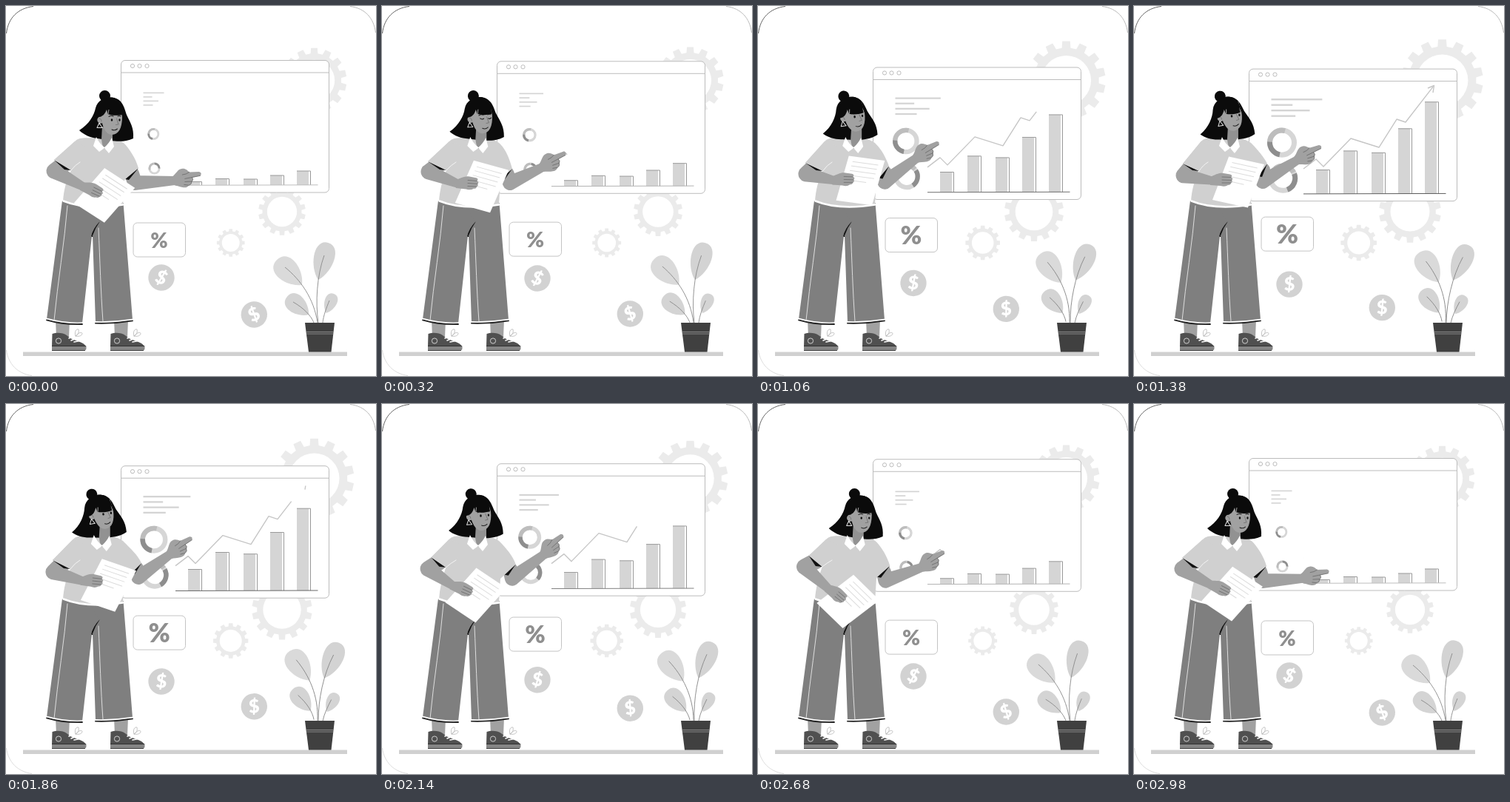
Write an HTML page that moves like this. It is 500x500 px and loops after 3 s.

```html
<!DOCTYPE html>
<html lang="en">
<head>
<meta charset="utf-8">
<title>Presenting growth</title>
<style>
  html, body { margin: 0; width: 100%; height: 100%; overflow: hidden; background: #fff; }
  svg { display: block; width: 100vw; height: 100vh; }
  text { font-family: Lato, "Open Sans", sans-serif; font-weight: 900; text-anchor: middle; }
  .line { fill: none; stroke-linecap: round; stroke-linejoin: round; }
  .skin { fill: #a1a1a1; }
  .shirt { fill: #d0d0d0; }
  .detail { fill: none; stroke: #666; stroke-width: .7; stroke-linecap: round; }
</style>
</head>
<body>
<svg viewBox="0 0 500 500">
  <g fill="none">
    <path d="M.5 37C3 16 16 3 37 .5" stroke="#666"/>
    <path d="M465 .5C485 3 497 16 499.500 36" stroke="#bbb"/>
    <path d="M.5 465C3 484 16 497 35 499.500" stroke="#ddd"/>
  </g>
  <rect x="23" y="467.500" width="438" height="5.500" fill="#d0d0d0"/>

  <g id="gears" fill="#ebebeb" fill-rule="evenodd"></g>

  <g id="window">
    <rect x="155.500" y="73.500" width="281" height="178.500" rx="5.500" fill="#fff" stroke="#bcbcbc"/>
    <path d="M155.500 90H436.500" stroke="#bcbcbc"/>
    <g fill="none" stroke="#bcbcbc">
      <circle cx="171" cy="81" r="2.600"/><circle cx="180.500" cy="81" r="2.600"/><circle cx="190.500" cy="81" r="2.600"/>
    </g>
    <g id="rings"></g>
    <g id="bars"></g>
    <path id="base" d="M229 242.300L421.500 241.800" stroke-width="1"/>
    <g transform="translate(0 -11.600)" class="line" stroke="#c6c6c6" stroke-width="1.400">
      <path id="trend" d="M229 220L246 207L256 217L293 179L331 191L355 153L367 157L405 108" style="stroke-linecap:butt"/>
      <path id="tip" d="M404 117L405.500 107.500L397 111" style="stroke-linecap:butt"/>
    </g>
  </g>
  <g id="lines" fill="#d4d4d4"></g>

  <g id="percent">
    <rect x="172" y="293" width="70.500" height="46" rx="5.500" fill="#fff" stroke="#c4c4c4"/>
    <g id="sign"><text y="10" font-size="28" fill="#8f8f8f">%</text></g>
  </g>
  <g id="coinA"><circle r="17.700" fill="#d2d2d2"/><text y="8.500" font-size="25" fill="#fff">$</text></g>
  <g id="coinB"><circle r="17.700" fill="#d2d2d2"/><text y="8.500" font-size="25" fill="#fff">$</text></g>

  <g id="plant"></g>
  <path d="M404 428H444L439.500 467.500H409Z" fill="#404040"/>
  <path d="M405.500 440.500H442.500M405.800 443H442" stroke="#aaa" stroke-width=".7"/>

  <g id="foot">
    <path d="M67 424H86L85 448L68 447Z" class="skin"/>
    <path d="M62.500 443C68 441 77 441 82 445L87 449C95 453 105 454 108 460H62Z" fill="#505050"/>
    <path d="M62 459.500H108.500V463Q108 465.800 105 465.800H62Z" fill="#858585"/>
    <path d="M62 459.500H108M62 465.500H107" stroke="#222" stroke-width=".8"/>
    <circle cx="71" cy="452.500" r="3.600" fill="none" stroke="#ddd" stroke-width=".9"/>
    <path class="line" d="M85 449L94 446M88 452L98 448M92 454L102 452" stroke="#fff" stroke-width="1.600"/>
    <path class="line" d="M94 446C92 440 95 436 98 437C99 441 97 445 94 446C98 441 103 440 103 443C102 446 98 447 94 446" stroke="#b5b5b5" stroke-width=".8"/>
  </g>
  <use href="#foot" x="79"/>
  <path d="M115 312L118 296L128 290L121 312Z" fill="#111"/>
  <path d="M76 263L55 423Q78 430 103 429L116 311Q119 300 126 292L158 266Z" fill="#7f7f7f"/>
  <path d="M126 292Q120 299 117 309L121 427Q146 428 171 424L158.500 266L110 264Z" fill="#7f7f7f"/>
  <path d="M115 312Q117 301 127 291Q121 299 117.500 309Z" fill="#111"/>
  <g class="line">
    <path d="M55 424.300Q78 431 103 430M121 428.700Q146 429.500 171 425.300" stroke="#222" stroke-width="1.800"/>
    <path d="M55.500 422.500Q78 429 103 428M121.500 426.800Q146 427.500 170.500 423.500" stroke="#fff" stroke-width="1.400"/>
    <path d="M83 270C79 320 70 372 65 425M125 300C127 345 128 385 131 426" stroke="#e8e8e8" stroke-width=".9"/>
  </g>

  <path id="armR" class="skin"/>
  <g id="handR">
    <path class="skin" d="M-2 -6C4 -8 8 -14 13 -13C18 -13 20 -9 22 -6L35 -3Q39 0 35 2.500L24 2Q25 6 22 7Q21 11 17 11Q14 14 9 12C4 10 1 7 -2 6Z"/>
    <path class="detail" d="M35 2.500L14 1M24 2Q25 6 22 7L13 5M22 7Q21 11 17 11L11 8.500M22 -6Q17 -4 12 -5"/>
  </g>
  <path id="cuffR" fill="#111"/>
  <path id="shirt" class="shirt"/>
  <path class="line" d="M77.500 263.500C100 272.500 130 273 158 268.500" stroke="#fff" stroke-width="2.600"/>

  <g id="headBack">
    <path d="M99 168C112 160 119 148 121 138C124 126 136 122 146 124C158 127 160 138 163 147C168 158 173 164 172 179C162 184 150 183 141 182L124 179C114 178 105 174 99 168Z" fill="#0b0b0b"/>
    <circle cx="133.500" cy="121.500" r="7.500" fill="#0b0b0b"/>
  </g>
  <g id="neck">
    <path d="M130 163L129 180Q130 190 133 193Q141 190 144 181V166Z" fill="#929292"/>
    <path d="M122 177L118 189L126 197L133 192L139 199L146 190L143 178Q139 186 133 191Q126 186 122 177Z" fill="#fff"/>
  </g>
  <g id="headFront">
    <g id="face">
      <path class="skin" d="M129 138C127 160 134 174 143 174C152 174 157 165 157 150L155 136Z"/>
      <circle cx="128" cy="154" r="4.700" class="skin"/>
      <path class="detail" d="M126 152Q129 152 129 156M149.500 152L152 160L148.500 160.500"/>
      <path class="line" d="M143 167Q147 169 150.500 166" stroke="#222"/>
      <path class="line" d="M139 149.500Q142 147.500 145 149M151 149Q153 147.800 155 149" stroke="#222"/>
      <path class="line" d="M126 158L123 164.500H130Z" stroke="#e2e2e2"/>
      <g id="open" fill="#111"><ellipse cx="143" cy="154" rx="1.300" ry="1.700"/><ellipse cx="153.500" cy="154" rx="1.200" ry="1.700"/></g>
      <path id="shut" class="line" d="M140.500 153.500Q143 155.500 145.500 154M151.500 154Q153.500 155.500 155.500 153.500" stroke="#111"/>
    </g>
    <path d="M121 151C119 129 134 121 146 124C157 127 158 136 159 149L156.500 140L157 147C150 148.500 143 148 137.500 146L136 140C134 145 132 148 128 149.500Z" fill="#0b0b0b"/>
    <path d="M139 140L138 146" stroke="#ddd" stroke-width=".7"/>
  </g>

  <g id="paper">
    <path d="M-20 -31H29L20 31H-29Z" fill="#fff"/>
    <path d="M-14 -24H21M-15 -18H20M-16 -11.500H19M-17 -5H18M-18 1.500H8" stroke="#dcdcdc"/>
  </g>
  <path id="armL" class="skin"/>
  <path id="cuffL" fill="#111"/>
  <path id="sleeveL" class="shirt"/>
  <path id="crease" class="line" stroke="#f4f4f4" stroke-width="1"/>
  <g id="handL">
    <path class="skin" d="M-2 -5C5 -8 10 -11 16 -10L25 -8.500Q29 -7 26 -4.500Q30 -3 27 -.5Q29 2 26 3Q26 6 22 6Q18 9 12 7L-2 6Z"/>
    <path class="detail" d="M26 -4.500L14 -5M27 -.5L14 -1M26 3L14 3"/>
  </g>
</svg>
<script>
const LOOP = 3000;
const KEYS = [0, 320, 800, 1380, 1860, 2440];
const $ = id => document.getElementById(id);
const set = (el, attrs) => { for (const k in attrs) el.setAttribute(k, attrs[k]); };
const move = (id, x, y, extra = "") => set($(id), { transform: `translate(${x} ${y}) ${extra}` });

function add(parent, tag, attrs) {
  const el = document.createElementNS("http://www.w3.org/2000/svg", tag);
  set(el, attrs);
  return parent.appendChild(el);
}

// One row per key time
const TRACKS = {
  head: [[0, 0], [-7, -3], [-11, -6], [-8, -9], [-8.5, -9], [-6.5, -1]],
  cuffL: [[65, 208, 88, 222], [62, 210, 87, 222], [62, 211, 87, 223], [66, 213, 88, 223], [63, 211, 87, 223], [70, 204, 86, 219]],
  elbowL: [[65, 223], [63, 224], [63, 225], [67, 229], [64, 227], [61, 219]],
  wristL: [[104, 244, 24], [102, 240, 2], [100, 236, 0], [105, 236, 0], [103, 239, 4], [90, 251, 40]],
  paper: [[133, 256, 33], [135, 244, 15.5], [136, 236, 6], [141, 238, 12.4], [138.5, 245, 19], [117, 270, 46.5]],
  cuffR: [[161, 234, 179, 219], [161, 233, 176, 220], [160, 234, 175, 219], [168, 230, 180, 213], [169, 229, 183, 215], [162, 233, 178, 218]],
  elbowR: [[174, 239], [173, 239], [170, 238], [174, 237], [179, 234], [172, 238]],
  wristR: [[228, 236, -15], [217, 218, -32], [210, 205, -39], [221, 208, -30], [222, 203, -37.5], [217, 208, -49.5]]
};

// Smooth looping curve through the rows of a track
function pose(name, t) {
  const rows = TRACKS[name], n = KEYS.length;
  const row = j => rows[(j + n) % n];
  const time = j => KEYS[(j + n) % n] + LOOP * Math.floor(j / n);
  let i = n - 1;
  while (KEYS[i] > t) i--;
  const span = time(i + 1) - time(i), u = (t - time(i)) / span;
  const slope = (j, c) => (row(j + 1)[c] - row(j - 1)[c]) / (time(j + 1) - time(j - 1)) * span;
  return row(i).map((a, c) => {
    const d = row(i + 1)[c] - a, m = slope(i, c), k = slope(i + 1, c);
    return a + u * (m + u * (3 * d - 2 * m - k + u * (m + k - 2 * d)));
  });
}

// Tapered limb with round ends
function limb([ax, ay], ra, [bx, by], rb) {
  const a = Math.atan2(by - ay, bx - ax), nx = Math.sin(a), ny = -Math.cos(a);
  return `M${ax + nx * ra} ${ay + ny * ra}L${bx + nx * rb} ${by + ny * rb}` +
    `A${rb} ${rb} 0 0 1 ${bx - nx * rb} ${by - ny * rb}L${ax - nx * ra} ${ay - ny * ra}` +
    `A${ra} ${ra} 0 0 1 ${ax + nx * ra} ${ay + ny * ra}Z`;
}

function gearPath(teeth, hole) {
  const step = 2 * Math.PI / teeth, pts = [];
  for (let i = 0; i < teeth; i++)
    for (const [off, r] of [[-.3, 83], [-.22, 100], [.22, 100], [.3, 83]]) {
      const a = (i + off) * step;
      pts.push(`${(Math.sin(a) * r).toFixed(1)} ${(-Math.cos(a) * r).toFixed(1)}`);
    }
  return `M${pts.join("L")}ZM${hole} 0A${hole} ${hole} 0 1 0 ${-hole} 0A${hole} ${hole} 0 1 0 ${hole} 0Z`;
}

const gears = [[416.5, 100.5, 44, 11.6, 14], [373, 278, 32, 10.2, 14], [303.7, 320, 19, 5.6, 12]]
  .map(([x, y, r, grow, teeth]) => ({ x, y, r, grow, el: add($("gears"), "path", { d: gearPath(teeth, 63) }) }));

const lines = [[28, 41.5], [12, 17], [20.5, 32], [13, 20]]
  .map(([w, grow]) => ({ w, grow, el: add($("lines"), "rect", { x: 185.5 }) }));

const bars = [[246, 4.5, 28], [283, 8.5, 50], [321, 8, 48], [357, 13, 76], [393, 19, 106.5]]
  .map(([x, h, grow]) => ({
    x, h, grow,
    fill: add($("bars"), "rect", { x, width: 16, fill: "#d5d5d5" }),
    edge: add($("bars"), "path", { fill: "none", stroke: "#999" })
  }));

// Each arc: start, length (percent of the circle), colour
const rings = [
  [199.3, 173, 0, 0, [[0, 100, "#d6d6d6"], [76, 28, "#bdbdbd"], [53, 23, "#8e8e8e"]]],
  [200.5, 219.5, 1.7, 70, [[0, 100, "#d6d6d6"], [70, 28, "#bdbdbd"], [0, 25, "#8e8e8e"]]]
].map(([x, y, drop, turn, arcs]) => {
  const el = add($("rings"), "g", {});
  for (const [from, len, stroke] of arcs)
    add(el, "circle", {
      r: 16.5, fill: "none", stroke, "stroke-width": 7, pathLength: 100,
      "stroke-dasharray": len < 100 ? `${len} ${100 - len}` : "none", transform: `rotate(${from * 3.6 - 90})`
    });
  return { x, y, drop, turn, el };
});

// Leaf: centre, half length, half width, tilt, sway, stem, colour
const leaves = [
  [428.5, 345, 26, 14, 15, 9.3, "M430 337C420 365 418 400 422 428", "#d3d3d3"],
  [383, 360, 24, 15.5, -45, 12.8, "M377 353C398 370 416 395 421 428", "#dadada"],
  [394.5, 405, 19, 12.5, -50, 14, "M388 400C402 408 412 418 416 428", "#d4d4d4"],
  [438, 402, 14, 8.5, 22, 6, "M437 398C433 408 429 418 428 428", "#d4d4d4"]
].map(([x, y, a, b, tilt, sway, stem, fill]) => {
  const el = add($("plant"), "g", {}), out = 1.45 * b, low = 1.2 * b;
  add(el, "path", {
    d: `M0 ${a}C${-low} ${.4 * a} ${-out} ${-a} 0 ${-a}C${out} ${-a} ${low} ${.4 * a} 0 ${a}Z`,
    fill, transform: `translate(${x} ${y}) rotate(${tilt})`
  });
  add(el, "path", { d: stem, fill: "none", stroke: "#8a8a8a", "stroke-width": .9 });
  return { el, sway };
});

const trendLen = $("trend").getTotalLength(), tipLen = $("tip").getTotalLength();

function reveal(id, len, part) {
  set($(id), { "stroke-dasharray": `${len * part} ${len * 2}`, visibility: part > 0 ? "visible" : "hidden" });
}

function drawScene(p) {
  for (const g of gears) set(g.el, { transform: `translate(${g.x} ${g.y}) scale(${(g.r + g.grow * p) / 100})` });
  move("window", 0, 11.8 * p);
  lines.forEach((l, i) => set(l.el, { y: 116.6 + 5.5 * i + p * (8.6 + 2 * i), width: l.w + l.grow * p, height: 1.6 + .8 * p }));
  for (const r of rings)
    set(r.el, { transform: `translate(${r.x + .7 * p} ${r.y + r.drop * p}) scale(${.4 + .61 * p}) rotate(${r.turn * p})` });
  for (const b of bars) {
    const h = b.h + b.grow * p, top = 242 - h;
    set(b.fill, { y: top, height: h });
    set(b.edge, { d: `M${b.x} ${top}H${b.x + 18.5}V242` });
  }
  const shade = Math.round(190 - 100 * p);
  set($("base"), { stroke: `rgb(${shade},${shade},${shade})` });
  reveal("trend", trendLen, Math.min(1, 1.01 * p));
  reveal("tip", tipLen, Math.max(0, Math.min(1, (p - .82) / .16)));

  move("percent", 0, -8 * p);
  move("sign", 207, 316.5, `scale(${1 + .29 * p})`);
  move("coinA", 210, 367 + 9.3 * p, `rotate(${25 * (1 - p)})`);
  move("coinB", 335.3, 417 - 9.5 * p, `rotate(${-25 * (1 - p)})`);
  for (const l of leaves) set(l.el, { transform: `rotate(${l.sway * p} 422 428)` });
}

function drawPerson(t, p) {
  const [hx, tilt] = pose("head", t);
  const turn = `rotate(${tilt} 133 180)`;
  move("headBack", hx, 0, turn);
  move("headFront", hx, 0, turn);
  move("face", -.2 * tilt, .4 * tilt);
  move("neck", hx * .38, 0);
  const blink = Math.abs(t - 320) < 90 || Math.abs(t - 2440) < 90;
  set($("open"), { visibility: blink ? "hidden" : "visible" });
  set($("shut"), { visibility: blink ? "visible" : "hidden" });

  const [rx, ry, sx, sy] = pose("cuffR", t), elbowR = pose("elbowR", t), wristR = pose("wristR", t);
  const cuffMid = [(rx + sx) / 2, (ry + sy) / 2];
  set($("armR"), { d: limb(cuffMid, 10, elbowR, 10) + limb(elbowR, 10, wristR, 6) });
  move("handR", wristR[0], wristR[1], `rotate(${wristR[2]})`);
  set($("cuffR"), { d: `M${rx} ${ry}L${sx} ${sy}L${rx + 5} ${ry + 1}Z` });

  const [ox, oy, ix, iy] = pose("cuffL", t), elbowL = pose("elbowL", t), wristL = pose("wristL", t);
  const s = hx * .3;
  set($("shirt"), {
    d: `M${120 + s} 178C${110 + s} 179 ${99 + s} 176 ${93 + s} 183L${ox} ${oy}L${ix} ${iy}` +
      `C81 236 78 250 77 264C100 272 130 272 158 268L160 236L${rx} ${ry}L${sx} ${sy}` +
      `C${sx - 4} 205 167 194 ${161 + s * .4} 187C156 182 150 181 ${143 + s} 178Z`
  });

  const [px, py, angle] = pose("paper", t);
  move("paper", px, py, `rotate(${angle})`);
  set($("armL"), { d: limb([(ox + ix) / 2, (oy + iy) / 2], 11, elbowL, 10.5) + limb(elbowL, 10.5, wristL, 5.7) });
  set($("cuffL"), { d: `M${ox} ${oy}L${ix} ${iy}L${ix - 9} ${iy - 1}Z` });
  set($("sleeveL"), { d: `M${93 + s} 183L${ox} ${oy}L${ix} ${iy}L100 211L108 190Z` });
  set($("crease"), { d: `M${ix} ${iy}Q93 215 100 211` });
  move("handL", wristL[0], wristL[1], `rotate(${wristL[2]})`);
}

const start = performance.now();
function frame() {
  const t = (performance.now() - start) % LOOP;
  const p = (1 - Math.cos(2 * Math.PI * t / LOOP)) / 2;
  drawScene(p);
  drawPerson(t, p);
  requestAnimationFrame(frame);
}
frame();
</script>
</body>
</html>
```
